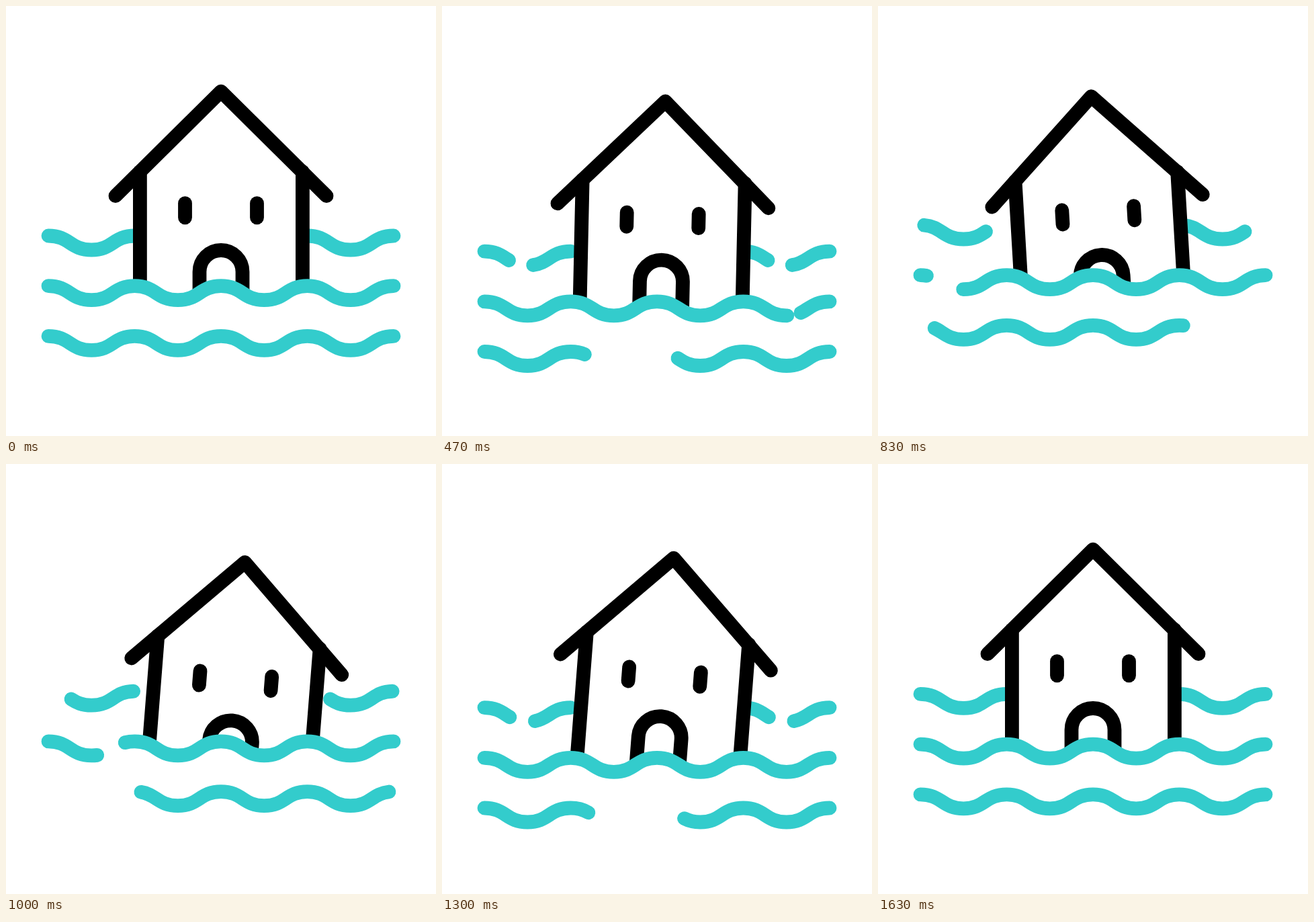
An HTML page with a canvas that plays this animation: 640 px wide and 640 px high, repeating every 1.67 s.

```html
<!DOCTYPE html>
<html lang="en">
<head>
<meta charset="utf-8">
<title>Flooded house</title>
<style>
  html, body { margin: 0; width: 100%; height: 100%; overflow: hidden; background: #fff; }
  canvas { display: block; width: 100%; height: 100%; }
</style>
</head>
<body>
<canvas id="stage" width="640" height="640"></canvas>
<script>
const ctx = document.getElementById('stage').getContext('2d');
const LOOP = 1670, STROKE = 20.8, WATER = '#33cccc';
const LEFT = 63, RIGHT = 577, HALF = (RIGHT - LEFT) / 8, DROP = 21;
const BACK_Y = 342, ROW = 74.7;
const PIVOT = { x: 320, y: 404 };

// Eased 0 to 1 between two moments, counted in steps of 1/30 second.
function rise(f, from, to) {
  const p = Math.min(Math.max((f - from) / (to - from), 0), 1);
  return p * p * (3 - 2 * p);
}
const pulse = (f, from, full, fade, to) => rise(f, from, full) * (1 - rise(f, fade, to));
const bump = (f, from, peak, to) => pulse(f, from, peak, peak, to);

// Arc length of one crest-to-trough curve.
const HALF_LENGTH = (() => {
  let sum = 0, lastX = 0, lastY = 0;
  for (let t = 0.01; t < 1.005; t += 0.01) {
    const x = HALF * (1.5 * t * (1 - t) + t ** 3), y = DROP * rise(t, 0, 1);
    sum += Math.hypot(x - lastX, y - lastY);
    lastX = x;
    lastY = y;
  }
  return sum;
})();

function traceWave(x, y, periods) {
  for (let i = 0; i < periods * 2; i++) {
    const from = i % 2 ? y + DROP : y, to = i % 2 ? y : y + DROP;
    ctx.bezierCurveTo(x + HALF / 2, from, x + HALF / 2, to, x + HALF, to);
    x += HALF;
  }
}

// A wave with one gap that travels along it and wraps round at the ends.
function drawWave(x, y, periods, gapEnd, gap) {
  const length = HALF_LENGTH * 2 * periods;
  ctx.save();
  ctx.strokeStyle = WATER;
  if (gap > 0.001) {
    ctx.setLineDash([(1 - gap) * length, gap * length]);
    ctx.lineDashOffset = -(gapEnd % 1) * length;
  }
  ctx.beginPath();
  ctx.moveTo(x, y);
  traceWave(x, y, periods);
  ctx.stroke();
  ctx.restore();
}

function line(...points) {
  ctx.beginPath();
  points.forEach(([x, y]) => ctx.lineTo(x, y));
  ctx.stroke();
}

// Keep only what stands above the water line.
function clipToWater(y) {
  ctx.beginPath();
  ctx.moveTo(0, 0);
  ctx.lineTo(0, y);
  ctx.lineTo(LEFT, y);
  traceWave(LEFT, y, 4);
  ctx.lineTo(640, y);
  ctx.lineTo(640, 0);
  ctx.clip();
}

// The house dips and leans right twice, leaning back left in between.
function poseHouse(f) {
  const first = bump(f, 0, 8, 22), second = bump(f, 19.5, 35, 43);
  const drift = 13.7 * pulse(f, 6, 23, 31, 43);
  const tilt = 7.7 * first + 8.8 * second - 7.5 * bump(f, 8, 20.8, 35);
  ctx.translate(PIVOT.x + drift, PIVOT.y + 24.2 * (first + second));
  ctx.rotate(tilt * Math.PI / 180);
  ctx.translate(0, -PIVOT.y);
}

function drawHouse(f, waterY) {
  const wall = 121, wallTop = 246.5, base = 540, nudge = 0.4;
  ctx.save();
  clipToWater(waterY);
  poseHouse(f);

  ctx.fillStyle = '#fff';
  ctx.strokeStyle = '#000';
  ctx.beginPath();
  ctx.moveTo(0, 127);
  ctx.lineTo(wall, wallTop);
  ctx.lineTo(wall, base);
  ctx.lineTo(-wall, base);
  ctx.lineTo(-wall, wallTop);
  ctx.fill();

  for (const side of [-1, 1]) {
    const x = side * wall + nudge, eye = side * 53.5;
    line([x, wallTop], [x, base]);
    line([eye, 293.6], [eye, 314.8]);
  }
  line([-157, 282.7], [0, 127.2], [157, 282.7]);

  ctx.beginPath();
  ctx.moveTo(-32, base);
  ctx.arc(0, 395.5, 32, Math.PI, 0);
  ctx.lineTo(32, base);
  ctx.stroke();
  ctx.restore();
}

function draw(ms) {
  const f = Math.floor((ms % LOOP + 4) * 0.03);
  const swell = 23.4 * bump(f, 0, 15, 25) - 16 * bump(f, 15, 25, 38) + 21 * bump(f, 25, 38, 50);
  const backY = BACK_Y + swell, midY = backY + ROW, frontY = midY + ROW;
  const travel = rise(f, 3, 45.2);
  const gapEnd = 0.337 + 1.32 * travel;
  const backGap = 0.28 * pulse(f, 0, 15.7, 39, 50);

  ctx.fillStyle = '#fff';
  ctx.fillRect(0, 0, 640, 640);
  ctx.lineWidth = STROKE;
  ctx.lineCap = ctx.lineJoin = 'round';

  drawWave(LEFT, backY, 1, gapEnd, backGap);
  drawWave(RIGHT - HALF * 2, backY, 1, gapEnd, backGap);
  drawHouse(f, midY);
  drawWave(LEFT, midY, 4, 0.816 + 0.579 * travel, 0.107 * pulse(f, 10, 20, 27, 37));
  drawWave(LEFT, frontY, 4, gapEnd, 0.28 * pulse(f, 0, 15.7, 40, 45));
}

const start = performance.now();
function tick() {
  draw(performance.now() - start);
  requestAnimationFrame(tick);
}
tick();
</script>
</body>
</html>
```
